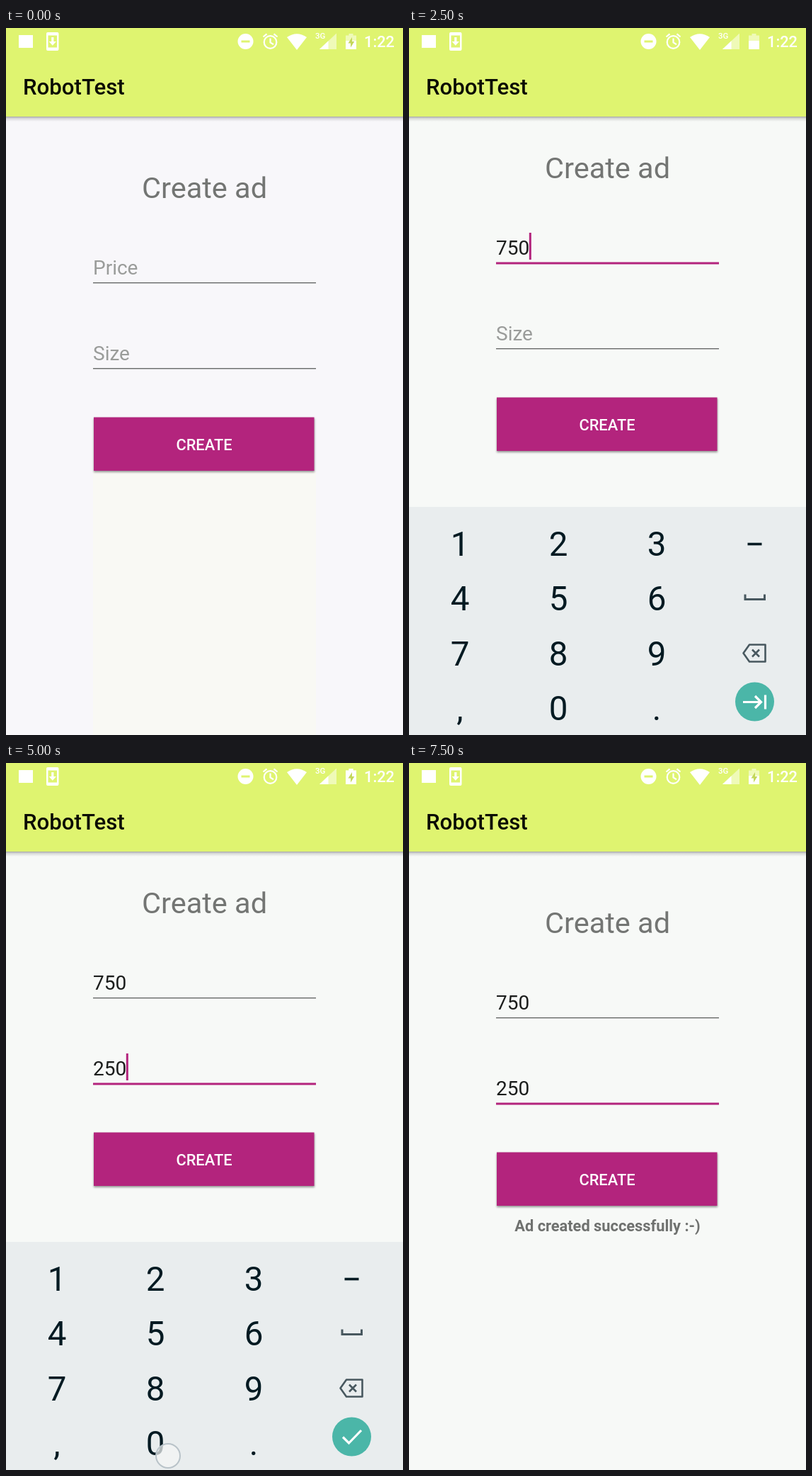
An HTML page that plays this animation: 561x998 px, repeating every 8 s.

```html
<!DOCTYPE html>
<html lang="en">
<head>
<meta charset="utf-8">
<title>Create ad</title>
<style>
  html, body { margin: 0; width: 100%; height: 100%; overflow: hidden; background: #f7f9f7; }
  svg { display: block; width: 100vw; height: 100vh; font-family: Roboto, sans-serif; }
  .mid { text-anchor: middle; }
  .field { font-size: 28px; }
  .line { fill: none; stroke-linecap: butt; stroke-linejoin: miter; }
</style>
</head>
<body>
<svg viewBox="0 0 561 998" xmlns="http://www.w3.org/2000/svg">
  <defs>
    <linearGradient id="barShadow" x1="0" y1="0" x2="0" y2="1">
      <stop offset="0" stop-color="#000" stop-opacity=".32"/>
      <stop offset=".4" stop-color="#000" stop-opacity=".12"/>
      <stop offset="1" stop-color="#000" stop-opacity="0"/>
    </linearGradient>
    <filter id="soft" x="-5%" y="-20%" width="110%" height="140%">
      <feGaussianBlur stdDeviation="1.6"/>
    </filter>
  </defs>

  <rect id="page" width="561" height="998"/>
  <rect id="panel" x="123" y="626" width="315" height="372" fill="#f9f9f4"/>

  <g id="form">
    <text class="mid" x="280.5" y="240" font-size="41.5" fill="#737573">Create ad</text>
    <text id="price" class="field" x="123" y="348"></text>
    <rect id="priceLine" x="123" width="315"/>
    <text id="size" class="field" x="123" y="469"></text>
    <rect id="sizeLine" x="123" width="315"/>
    <rect id="cursor" width="3" height="38" fill="#b3247d"/>
    <rect x="124" y="551" width="312" height="76" fill="#000" opacity=".4" filter="url(#soft)"/>
    <rect x="124" y="549.5" width="311.5" height="75.5" fill="#b3247d"/>
    <text class="mid" x="280" y="596" font-size="21.8" font-weight="500" fill="#fff">CREATE</text>
    <text id="message" class="mid" x="280.5" y="660.5" font-size="21.8" font-weight="700" fill="#6f716f">Ad created successfully :-)</text>
  </g>

  <rect width="561" height="125" fill="#dff470"/>
  <rect y="125" width="561" height="7" fill="url(#barShadow)"/>
  <text x="24" y="94" font-size="31.2" font-weight="500" fill="#0a0c04">RobotTest</text>

  <g fill="#fff">
    <rect x="18" y="10" width="20" height="18"/>
    <path fill-rule="evenodd" d="M59 6h13.500q2 0 2 2v22q0 2-2 2h-13.500q-2 0-2-2v-22q0-2 2-2zM59.500 10.500v17h12.500v-17z"/>
    <path d="M64.200 13h3.200v6h3.600l-5.200 5.800-5.200-5.800h3.600z"/>
    <circle cx="338.500" cy="19" r="11"/>
    <path d="M332.500 17.500h12v3h-12z" fill="#dff470"/>
    <path d="M397 13Q411 3.500 425 13L411 31z"/>
    <text x="437" y="15" font-size="11.500" font-weight="500">3G</text>
    <path d="M467 7.500V30H443z" opacity=".5"/>
    <path d="M455.500 18.300V30H443z"/>
    <text x="506" y="27" font-size="21.800" font-weight="500">1:22</text>
  </g>
  <g class="line" stroke="#fff" stroke-width="2.200">
    <circle cx="373.500" cy="20" r="8.800"/>
    <path d="M373.500 14.500v6l4.500 2.800M363.500 12.500l5-4.200M383.500 12.500l-5-4.200"/>
  </g>

  <path d="M484.500 8h6v2.500h4.500v19.500h-15v-19.500h4.500z" fill="#fff" opacity=".5"/>
  <g id="charge"><path d="M484.500 8h6v2.500h4.500v19.500h-15v-19.500h4.500z" fill="#fff"/></g>
  <path id="bolt" d="M489 13l-5.500 8.500h3.500v6l5.300-8.500h-3.300z" fill="#c3d75a"/>

  <g id="keyboard">
    <rect y="676" width="561" height="322" fill="#e9edee"/>
    <g id="keys" class="mid" font-size="47.500" fill="#031a22"></g>
    <path d="M478.500 728.500h20" stroke="#031a22" stroke-width="3.600"/>
    <g class="line" stroke="#48585f" stroke-width="3">
      <path d="M475 799.500v7h27.500v-7"/>
      <path d="M481 870.500h22.500v24h-22.500l-8.500-12z" stroke-width="2.600" stroke-linejoin="round"/>
      <path d="M485 877.500l10 10m0-10l-10 10" stroke-width="2.600"/>
    </g>
    <circle id="action" cx="488.500" cy="951" r="27.500"/>
    <g class="line" stroke="#fff" stroke-width="3.200">
      <path id="next" d="M472 951.500h25M489 943l8.500 8.500-8.500 8.500M503.500 941.500v20"/>
      <path id="done" d="M476 951.500l8.500 8.500 17.500-18"/>
    </g>
  </g>

  <circle id="touch" r="17" fill="#f4f6f6" fill-opacity=".72" stroke="#b9c3c9" stroke-width="2"/>
</svg>
<script>
const LOOP = 8000;
const SHIFT = 28;
const KEYBOARD_HEIGHT = 322;
const $ = id => document.getElementById(id);
const set = (id, attrs) => {
  for (const name in attrs) $(id).setAttribute(name, attrs[name]);
};
const show = (id, visible) => set(id, { visibility: visible ? 'visible' : 'hidden' });
const clamp = v => Math.min(1, Math.max(0, v));
const easeOut = v => 1 - (1 - clamp(v)) ** 2;
const latest = (list, t) => list.filter(item => item.at <= t).pop();

const focusPrice = 560, focusSize = 3400, submit = 7200;
const priceKeys = [{ at: 1600, key: '7' }, { at: 1930, key: '5' }, { at: 2250, key: '0' }];
const sizeKeys = [{ at: 4420, key: '2' }, { at: 4750, key: '5' }, { at: 5000, key: '0' }];
const cursorStarts = [{ at: focusPrice }, ...priceKeys, { at: focusSize }, ...sizeKeys];

const touches = [
  { at: 300, end: 550, x: 270, y: 340 },
  { at: 1450, end: 1790, x: 63.5, y: 860 },
  { at: 1850, end: 2080, x: 222, y: 806 },
  { at: 2150, end: 2450, x: 227, y: 979 },
  { at: 3250, end: 3500, x: 262, y: 430 },
  { at: 4300, end: 4590, x: 223, y: 749 },
  { at: 4660, end: 4850, x: 222, y: 804 },
  { at: 4920, end: 5210, x: 229, y: 978 },
  { at: 5880, end: 6090, x: 510.5, y: 976 },
  { at: 7000, end: 7250, x: 285, y: 590 }
];

const battery = [
  { at: 0, level: .55, bolt: true },
  { at: 600, level: 1, bolt: true },
  { at: 1400, level: 1, bolt: false },
  { at: 2300, level: .55, bolt: false },
  { at: 2800, level: .8, bolt: true },
  { at: 3400, level: 1, bolt: true },
  { at: 4400, level: .8, bolt: true },
  { at: 5000, level: 1, bolt: true },
  { at: 6500, level: .8, bolt: true },
  { at: 7100, level: .55, bolt: true }
];

$('keys').innerHTML = ['123', '456', '789', ',0.'].map((row, r) =>
  [...row].map((key, c) =>
    `<text x="${72 + 139 * c}" y="${745 + 77.4 * r}">${key}</text>`).join('')).join('');

function drawField(id, keys, hint, focused, y, t) {
  const text = keys.filter(k => k.at <= t).map(k => k.key).join('');
  $(id).textContent = text || hint;
  set(id, { fill: text ? '#1b1d1c' : '#9a9c9a' });
  set(id + 'Line', {
    y: focused ? y - 1 : y - .5,
    height: focused ? 3 : 1.4,
    fill: focused ? '#b3247d' : '#686a69'
  });
  return text.length;
}

function draw(t) {
  const started = t >= 300;
  set('page', { fill: started ? '#f7f9f7' : '#f8f7fa' });
  show('panel', !started);

  const raised = t >= 700 && t < 6100;
  set('form', { transform: `translate(0 ${raised ? -SHIFT : 0})` });

  const onSize = t >= focusSize;
  const priceLength = drawField('price', priceKeys, 'Price', t >= focusPrice && !onSize, 359.5, t);
  const sizeLength = drawField('size', sizeKeys, 'Size', onSize, 480.5, t);
  const start = latest(cursorStarts, t);
  show('cursor', start && (t - start.at) % 1000 < 500);
  set('cursor', {
    x: 123 + 15.6 * (onSize ? sizeLength : priceLength),
    y: onSize ? 438 : 317
  });
  show('message', t >= submit);

  const open = easeOut((t - 580) / 270) - easeOut((t - 6080) / 200);
  set('keyboard', { transform: `translate(0 ${KEYBOARD_HEIGHT * (1 - open)})` });
  const pressed = t >= 5880 && t < 6150;
  set('action', { fill: pressed ? '#00a192' : '#4bb6a8', r: pressed ? 28 : 27.5 });
  show('next', !onSize);
  show('done', onSize);

  const { level, bolt } = latest(battery, t);
  $('charge').style.clipPath = `inset(${(1 - level) * 100}% 0 0 0)`;
  show('bolt', bolt);

  const touch = touches.find(p => t >= p.at && t < p.end);
  show('touch', touch);
  if (touch) set('touch', { cx: touch.x, cy: touch.y });
}

const origin = performance.now();
function tick() {
  draw((performance.now() - origin) % LOOP);
  requestAnimationFrame(tick);
}
draw(0);
requestAnimationFrame(tick);
</script>
</body>
</html>
```
